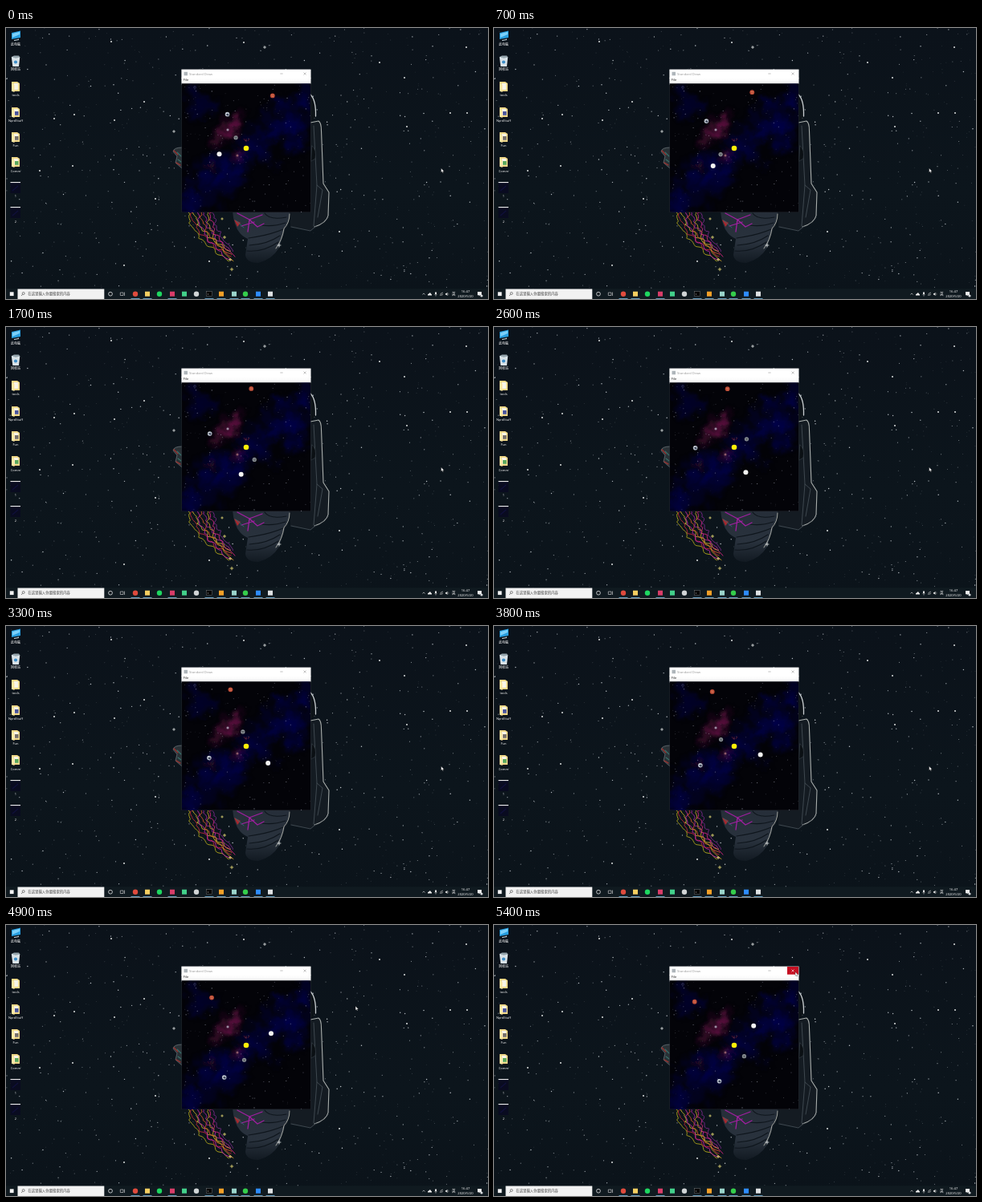
An HTML page that plays this animation: 600x338 px, repeating every 5.5 s.

```html
<!DOCTYPE html>
<html lang="zh">
<head>
<meta charset="utf-8">
<title>Orbits</title>
<style>
html, body { margin: 0; width: 100%; height: 100%; overflow: hidden; background: #0c141b; }
svg { display: block; width: 600px; height: 338px; }
text { font-family: "Open Sans", "Noto Sans CJK SC", "Noto Sans CJK", sans-serif; }
</style>
</head>
<body>
<svg id="stage" viewBox="0 0 600 338" xmlns="http://www.w3.org/2000/svg">
  <defs>
    <linearGradient id="sky" x2="0" y2="1">
      <stop offset="0" stop-color="#0b121a"/><stop offset=".6" stop-color="#0c151c"/><stop offset="1" stop-color="#0b131a"/>
    </linearGradient>
    <linearGradient id="bar" x2="0" y2="1">
      <stop offset="0" stop-color="#fff"/><stop offset=".6" stop-color="#fafafa"/><stop offset="1" stop-color="#dcdcdc"/>
    </linearGradient>
    <linearGradient id="body" x2="0" y2="1">
      <stop offset="0" stop-color="#262e39"/><stop offset=".6" stop-color="#29323d"/><stop offset="1" stop-color="#121a22"/>
    </linearGradient>
    <filter id="cloud" x="-20%" y="-20%" width="140%" height="140%">
      <feGaussianBlur stdDeviation="3" result="b"/>
      <feTurbulence type="fractalNoise" baseFrequency=".08" numOctaves="3" seed="4" result="n"/>
      <feDisplacementMap in="b" in2="n" scale="14" xChannelSelector="R" yChannelSelector="G"/>
    </filter>
    <clipPath id="view"><rect x="219" y="69.5" width="160" height="160"/></clipPath>
  </defs>

  <rect width="600" height="338" fill="url(#sky)"/>
  <g id="stars" fill="#d5dbe0"></g>

  <!-- astronaut -->
  <g stroke-linecap="round" stroke-linejoin="round">
    <path d="M378 83Q386 88 386 110L379 118Z" fill="#0d1318"/>
    <path d="M379 83Q386 90 385.5 110" fill="none" stroke="#c9ced1" stroke-width="1.3"/>
    <path d="M379 118L389 116Q393 118 393 128L396 194L402 205L401 236Q399 243 392 246L379 253L354 249V228H379Z" fill="#141b22"/>
    <path d="M379 118L389 116Q392.5 118 392.5 128L395 194L402 205L401 234Q399 243 384 248" fill="none" stroke="#a9aeac" stroke-width="1.1"/>
    <path d="M383 122L387 196L383 247M387 196L394 202L388 236M355 248L379 253L386 247" fill="none" stroke="#4a535b" stroke-width=".8"/>
    <path d="M381 147Q387 152 385 163L380 166Z" fill="#0b1014" stroke="#39424a" stroke-width=".6"/>
    <path d="M219 149Q209 149 208 154L213 160L211 168L219 175Z" fill="#293136" stroke="#697177" stroke-width=".8"/>
    <path d="M209 153L214 158M212 168L217 171" stroke="#a3322f" stroke-width="1.2"/>
    <path d="M213 155L218 160M214 164L218 167" stroke="#37706b" stroke-width="1.1"/>
    <path d="M282 228H354Q355 242 347 251L340 274Q331 289 314 293Q299 293 298 283L301 263Q284 256 282 228Z" fill="url(#body)"/>
    <path d="M354 230Q354 244 345 251Q326 259 302 262M303 271Q325 270 341 259M300 278Q320 280 339 267M322 231Q328 240 349 236M319 246Q333 248 348 243" fill="none" stroke="#0e151c" stroke-width="1.2"/>
    <path d="M353 232Q353 243 346 250Q344 264 336 275" fill="none" stroke="#b4b6ae" stroke-width=".9"/>
    <path d="M288 231L303 239L319 233M303 239L301 254M303 239L313 248L321 244M293 247L309 242" fill="none" stroke="#a01fa0" stroke-width="1.3"/>
    <path d="M284 239L292 243L288 248Z" fill="#a52a30"/>
    <path d="M286 240L296 249" stroke="#2d6a71" stroke-width=".9"/>
  </g>
  <g id="tentacles" fill="none" stroke-linecap="round"></g>
  <g id="sparks" stroke-linecap="round"></g>
  <g id="desk" fill="#fff" text-anchor="middle"></g>

  <!-- window -->
  <rect x="218.5" y="69" width="161" height="161" fill="#22272d"/>
  <rect x="218.4" y="51.6" width="161.1" height="11" fill="#fff"/>
  <rect x="218.4" y="62" width="161.1" height="7.5" fill="url(#bar)"/>
  <rect x="221.5" y="54.8" width="4.5" height="4.5" fill="#aeb5ba"/>
  <text x="228" y="58.5" font-size="4.2" fill="#999">Standard Draw</text>
  <text x="220.8" y="66.4" font-size="4" fill="#111">File</text>
  <path d="M341.3 57H344.7" stroke="#999" stroke-width=".6"/>
  <rect id="close" x="365" y="52" width="14" height="9.7" fill="#c50f22"/>
  <path id="cross" d="M370.5 55.5L373.5 58.5M373.5 55.5L370.5 58.5" stroke-width=".6"/>
  <g clip-path="url(#view)">
    <rect x="219" y="69" width="160" height="161" fill="#030308"/>
    <g id="nebula" filter="url(#cloud)"></g>
    <g id="far" fill="#c5c7d8"></g>
    <g id="planets"></g>
  </g>

  <g id="task"></g>
  <path id="cursor" d="M0 0V5L1.2 4L2 5.8L2.8 5.4L2 3.7H3.6Z" fill="#fff" stroke="#111" stroke-width=".3"/>
</svg>
<script>
const $ = id => document.getElementById(id);
const NS = "http://www.w3.org/2000/svg";
function add(parent, tag, attrs, text) {
  const e = document.createElementNS(NS, tag);
  for (const k in attrs) e.setAttribute(k, attrs[k]);
  if (text) e.textContent = text;
  return (typeof parent === "string" ? $(parent) : parent).appendChild(e);
}
const dot = (p, cx, cy, r, fill, more) => add(p, "circle", { cx, cy, r, fill, ...more });
const box = (p, x, y, width, height, fill, more) => add(p, "rect", { x, y, width, height, fill, ...more });
const line = (p, d, stroke, w, more) => add(p, "path", { d, stroke, "stroke-width": w, fill: "none", ...more });
const label = (p, x, y, size, s, fill, more) => add(p, "text", { x, y, "font-size": size, fill, ...more }, s);

let seed = 71;
function rnd(a = 0, b = 1) {
  seed = (seed * 1664525 + 1013904223) % 4294967296;
  return a + (b - a) * seed / 4294967296;
}

function drawSky() {
  for (let i = 0; i < 900; i++) {
    const m = rnd() ** 2;
    add("stars", "circle", { cx: rnd(0, 600), cy: rnd(0, 326), r: .4 + .35 * m, opacity: .25 + .65 * m });
  }
  const bright = [[131,17], [573,24], [296,18], [135,115], [172,92], [42,178], [83,172], [85,108],
    [553,106], [574,106], [496,62], [499,123], [465,43], [147,296], [186,213], [60,113], [253,291], [415,254]];
  for (const [x, y] of bright) dot("stars", x, y, .9, "#f4f6f5");
  const sparks = [[322,24,1.5], [209,129,1.4], [340,271,2], [281,301,1.8], [272,261,1.6], [279,289,1.6], [269,238,1.2]];
  sparks.forEach(([x, y, s], i) =>
    line("sparks", `M${x - s} ${y}h${2 * s}M${x} ${y - s}v${2 * s}`, i > 2 ? "#efe37a" : "#e8ebea", .8));
}

function drawTentacles() {
  const tones = ["#b3a81c", "#c42a3a", "#c9b52a", "#c425ae", "#d4582a", "#a823a0", "#c9a02a", "#d7277f", "#7c2a8c"];
  tones.forEach((c, i) => {
    let d = "";
    for (let k = 0; k <= 60; k++) {
      const u = k / 60;
      const wave = Math.sin(u * 19 + i * 2.1) * 1.3 + Math.sin(u * 43 + i * 1.3) * 1.1;
      const x = 227 + i * 3.9 + u * u * (51 - i * 3.2) + wave;
      const y = 229 + u * (61 - i % 3 * 6) + Math.cos(u * 37 + i) * 1.2;
      d += (k ? "L" : "M") + x.toFixed(1) + " " + y.toFixed(1);
    }
    line("tentacles", d, c, .9);
  });
}

function folder(y, tone) {
  const g = add("desk", "g", { transform: `translate(7 ${y - 6})` });
  add(g, "path", { d: "M0 0H7L10 2V12H0Z", fill: "#f1d888" });
  box(g, 2.6, 2, 5.5, 8, "#f7f5e9");
  if (tone) box(g, 4, 5, 4.6, 4.8, tone);
  add(g, "path", { d: "M0 2L3.5 4V13L0 11.7Z", fill: "#ffe8a4" });
}

function drawDesk() {
  const g = $("desk");
  add(g, "path", { d: "M7 6L18 3.5V12L7 14Z", fill: "#279ee0" });
  add(g, "path", { d: "M8 7L17 4.8V8L8 12Z", fill: "#7bd0fa" });
  line(g, "M10 15.5L16 14.5", "#d0dbe0", 1);
  add(g, "path", { d: "M6.8 36L17.3 36L16 48H8.3Z", fill: "#d9e2e7" });
  add(g, "path", { d: "M7 36L10 34.5H16L17.3 36.5L12 37.7Z", fill: "#96a5ad" });
  dot(g, 12, 42.5, 2.1, "#3f8fc9");
  folder(73); folder(105, "#4a559c"); folder(136, "#77716b"); folder(167, "#5ba85c");
  for (const y of [192, 223]) {
    box(g, 5.5, y, 12.5, 14, "#090b20");
    box(g, 5.5, y, 12.5, 1.1, "#eee");
    line(g, `M8 ${y + 11}L15 ${y + 5}`, "#10103a", 1.5);
  }
  const names = ["此电脑", "回收站", "tools", "NerdStuff", "Fun", "Comm", "1", "2"];
  names.forEach((s, i) => label(g, 12, 21.8 + i * 31.6, 4, s, "#fff"));
}

function drawNebula() {
  const blue = (x, y, r, o) => dot("nebula", x, y, r, "#0a0a5a", { opacity: o });
  for (let i = 0; i < 210; i++) {
    const u = rnd();
    blue(223 + 156 * u, 220 - 122 * u + (rnd() + rnd() - 1) * 46, rnd(3, 8), .24);
  }
  for (const [x, y, r] of [[237,103,11], [232,80,9], [245,90,8], [340,95,10], [368,90,10], [235,218,10], [257,99,9], [350,120,9]])
    blue(x, y, r, .35);
  for (let i = 0; i < 34; i++) {
    const u = rnd(-1, 1);
    dot("nebula", 278 + u * 16 + rnd(-7, 7), 124 - u * 15 + rnd(-9, 9), rnd(3, 6), "#7c1752", { opacity: .25 });
  }
  dot("nebula", 289, 160, 5, "#741438", { opacity: .5 });
  dot("nebula", 255, 172, 4, "#4a101e", { opacity: .35 });
  for (let i = 0; i < 190; i++)
    add("far", "circle", { cx: rnd(219, 379), cy: rnd(70, 230), r: rnd(.3, .6), opacity: rnd(.2, .75) });
  dot("far", 276, 127, 1.8, "#83728c", { opacity: .8 });
  dot("far", 276, 127, .8, "#d9cfda");
  dot("far", 288, 159, 1.5, "#8c5a68");
  line("far", "M296 138l2 3M299 138v4M303 138l-2 3", "#74222c", .7);
  line("far", "M251 170l2 3M255 170v4M259 170l-2 3", "#431622", .6);
  line("far", "M233 74h4M235 72v5", "#777ba8", .6, { "stroke-dasharray": ".7 .8" });
}

function drawTask() {
  const g = $("task"), y = 331.7;
  box(g, 0, 325.3, 600, 12.7, "#101a20");
  box(g, 4.8, 329.3, 4.8, 4.8, "#f2f2f2");
  box(g, 14.5, 325.5, 107.8, 12.5, "#f2f2f2");
  dot(g, 21.7, 331, 1.5, "none", { stroke: "#333", "stroke-width": .55 });
  line(g, "M20.7 332.2L19 334", "#333", .6);
  label(g, 27.3, 333.4, 4.4, "在这里输入你要搜索的内容", "#444");
  dot(g, 130, y, 2.4, "none", { stroke: "#fff", "stroke-width": .7 });
  line(g, "M142.3 330H146V333.5H142.3ZM147.5 329.5V334", "#ddd", .6);
  const round = { 161: "#df4b3d", 191: "#1ed760", 237: "#d1d5d6", 298: "#35cd4b" };
  const square = { 176: "#f5cf61", 207: "#d93d69", 222: "#43d18b", 268: "#f3a027", 284: "#9bd4cb", 314: "#2d8cff" };
  for (const x in round) dot(g, x, y, 3.2, round[x]);
  for (const x in square) box(g, x - 3, y - 3, 6, 6, square[x]);
  box(g, 249.5, 328.8, 7, 5.8, "#050505", { stroke: "#888", "stroke-width": .4 });
  line(g, "M251 331l1 1l-1 1", "#ddd", .4);
  box(g, 326, y - 3, 6, 6, "#dfe2e4");
  for (const x of [161, 176, 207, 253, 268, 284, 298, 314, 329]) box(g, x - 5.5, 337.2, 11, .8, "#76b9e2");
  line(g, "M518.5 332.5l1.5-1.6l1.5 1.6", "#eee", .6);
  add(g, "path", { d: "M525 333.5Q524.5 331.5 526.3 331.5Q528 329.2 529 331.5Q530.5 332 530 333.5Z", fill: "#eee" });
  box(g, 534, 329.3, 2, 3.3, "#eee", { rx: 1 });
  line(g, "M533.3 332.3Q535 334.6 536.7 332.3M535 333.5V334.8", "#ddd", .4);
  line(g, "M540.5 334Q540.5 330 544 330M542 334Q542 332 544 332", "#ddd", .6);
  add(g, "path", { d: "M547 331H548L549.5 329.7V334L548 332.8H547Z", fill: "#ddd" });
  line(g, "M550.5 330.5Q551.5 332 550.5 333.3", "#bbb", .4);
  label(g, 557.2, 333.3, 4.6, "英", "#fff", { "text-anchor": "middle" });
  label(g, 572, 330.2, 4.1, "16:47", "#fff", { "text-anchor": "middle" });
  label(g, 572, 336, 4.1, "2020/5/20", "#fff", { "text-anchor": "middle" });
  add(g, "path", { d: "M587 329H592V333.2H590L588.8 334.5V333.2H587Z", fill: "#eee" });
  dot(g, 592, 334, 1.6, "#d6dadc");
}

// radius, start angle, degrees per second
const orbits = [
  { r: 18.5, a: 134.3, w: 99.6 },
  { r: 34.3, a: 192.4, w: 39.4 },
  { r: 48.4, a: 119, w: 23.8 },
  { r: 73.3, a: 63.4, w: 12.75 }
];

function drawPlanets() {
  const g = $("planets");
  dot(g, 299, 150, 3.3, "#ffee08");
  for (const o of orbits) o.g = add(g, "g", {});
  const [mercury, venus, earth, mars] = orbits.map(o => o.g);
  dot(mercury, 0, 0, 2.6, "#91979a");
  line(mercury, "M-1.7 -.5H1.7M-1 1H1.2", "#343a40", .7);
  dot(venus, 0, 0, 3, "#f3f3f1");
  dot(earth, 0, 0, 2.8, "#b5bdc8");
  add(earth, "path", { d: "M-2 -.8L.3 -1.2L2 .5L.8 1.8L-.7 .8Z", fill: "#343c50" });
  dot(earth, -.8, -1.2, .8, "#f1f3f5");
  dot(mars, 0, 0, 2.9, "#bd4b35");
  line(mars, "M-1.7 -.9L1.5 -.6M-1 1.1L1.4 1", "#e09070", .6);
}

function pointer(ms) {
  if (ms < 4200) return [541.7, 175];
  if (ms <= 4300) return [541.7 + (ms - 4200) * .04, 175 + (ms - 4200) * .05];
  const u = Math.min(1, (ms - 4300) / 1000), e = u * u * (3 - 2 * u);
  return [545.7 - 170.7 * e, 180 - 121.5 * e];
}

function render(ms) {
  for (const { r, a, w, g } of orbits) {
    const t = (a + w * ms / 1000) * Math.PI / 180;
    g.setAttribute("transform", `translate(${299 + r * Math.cos(t)} ${150 - r * Math.sin(t)})`);
  }
  const [x, y] = pointer(ms);
  $("cursor").setAttribute("transform", `translate(${x} ${y})`);
  const over = x >= 365 && x <= 379 && y >= 52 && y <= 62;
  $("close").setAttribute("opacity", over ? 1 : 0);
  $("cross").setAttribute("stroke", over ? "#fff" : "#999");
}

drawSky();
drawTentacles();
drawDesk();
drawNebula();
drawTask();
drawPlanets();

const start = performance.now();
function tick() {
  const ms = (performance.now() - start) % 5500;
  render(Math.floor(ms / 100) * 100);
  requestAnimationFrame(tick);
}
tick();
</script>
</body>
</html>
```
